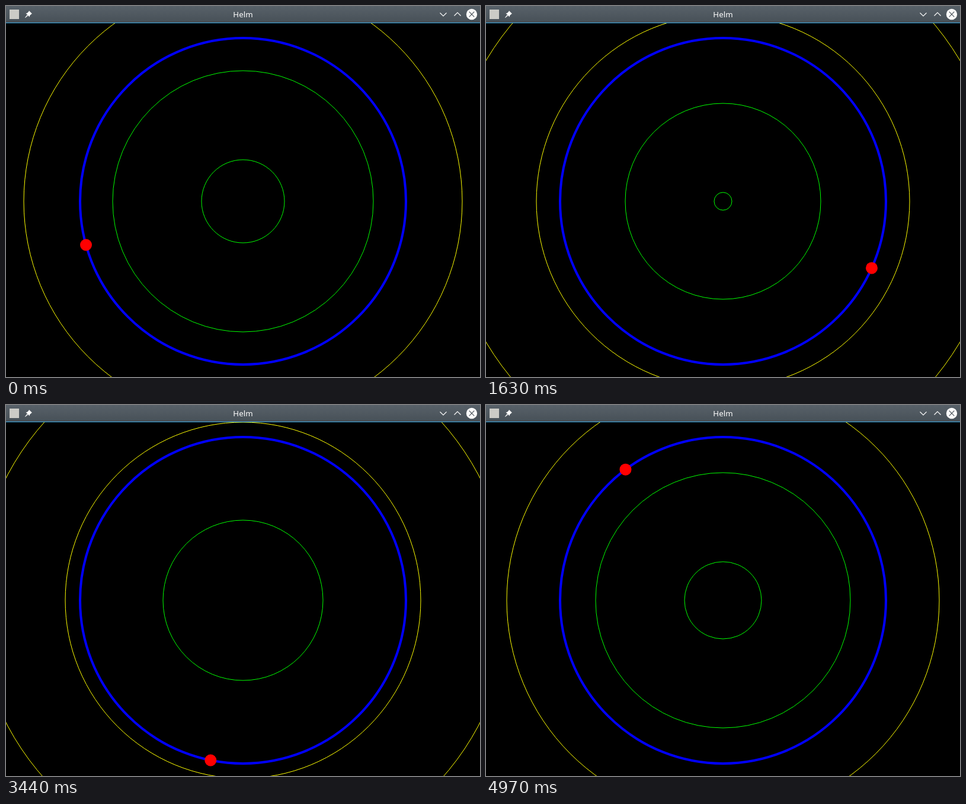
An HTML page for the animation above (5000 ms loop, 800 px wide and 625 px high).

```html
<!DOCTYPE html>
<html lang="en">
<head>
<meta charset="utf-8">
<title>Helm</title>
<style>
  html, body { margin: 0; width: 100%; height: 100%; overflow: hidden; background: #000; }
  svg { display: block; }
  text { font: 13.33px "Noto Sans", sans-serif; fill: #fcfcfc; text-anchor: middle; }
</style>
</head>
<body>
<svg width="800" height="625" viewBox="0 0 800 625" fill="none">
  <defs>
    <linearGradient id="bar" x2="0" y2="1">
      <stop stop-color="#586169"/>
      <stop offset="1" stop-color="#475057"/>
    </linearGradient>
  </defs>

  <g id="rings"></g>
  <circle cx="400" cy="329" r="275" stroke="#00f" stroke-width="4"/>
  <circle id="dot" r="10" fill="#f00"/>

  <!-- title bar -->
  <rect width="800" height="28" fill="url(#bar)"/>
  <rect y="28" width="800" height="1" fill="#3daee9"/>
  <rect x="6" y="6" width="16" height="16" fill="#cbcbc6"/>
  <g fill="#fcfcfc">
    <path d="M39 8 L44 13 L42.5 13.8 L40 16.3 L39.8 18.5 L33.5 12.2 L35.7 12 L38.2 9.5Z"/>
    <path d="M35.8 14.8 L37.2 16.2 L32.5 20 L32 19.5Z"/>
    <circle cx="786" cy="14" r="9.2"/>
  </g>
  <text x="400" y="19">Helm</text>
  <path d="M732.5 11.5 L738 17 L743.5 11.5 M756.5 16.5 L762 11 L767.5 16.5" stroke="#fcfcfc" stroke-width="1.2"/>
  <path d="M781.7 9.7 L790.3 18.3 M790.3 9.7 L781.7 18.3" stroke="#475057" stroke-width="1.2"/>
</svg>
<script>
  const LOOP = 5000, FPS = 30, FRAMES = 150;
  const SPAWN_GAP = 30, FIRST_SPAWN = 16;
  const TURN_STEP = 64, TURN_RATE = 0.05, START_ANGLE = 2.871;
  const CX = 400, CY = 329, TRACK = 275;

  const dot = document.getElementById('dot');
  const ringGroup = document.getElementById('rings');

  function setAttrs(el, attrs) {
    for (const key in attrs) el.setAttribute(key, attrs[key]);
  }

  const rings = Array.from({ length: 4 }, () => {
    const ring = document.createElementNS('http://www.w3.org/2000/svg', 'circle');
    setAttrs(ring, { cx: CX, cy: CY });
    return ringGroup.appendChild(ring);
  });

  // The game runs three steps ahead of the picture during one second.
  function stepAt(frame) {
    return frame + Math.max(0, Math.min(3, Math.floor((frame - 46) / 10)));
  }

  function draw(now) {
    const frame = Math.min(FRAMES - 1, Math.floor((now % LOOP + 5) * FPS / 1000));
    const step = stepAt(frame);
    const newest = FIRST_SPAWN + Math.floor((frame - FIRST_SPAWN) / SPAWN_GAP) * SPAWN_GAP;

    rings.forEach((ring, i) => {
      const r = 5 * (step - stepAt(newest - i * SPAWN_GAP));
      setAttrs(ring, { r, stroke: r > TRACK ? '#ff0' : '#0f0' });
    });

    // The dot runs one way, then turns back.
    const angle = START_ANGLE + TURN_RATE * (Math.abs(step - TURN_STEP) - TURN_STEP);
    setAttrs(dot, { cx: CX + TRACK * Math.cos(angle), cy: CY + TRACK * Math.sin(angle) });
  }

  function tick() {
    draw(performance.now());
    requestAnimationFrame(tick);
  }
  tick();
</script>
</body>
</html>
```
